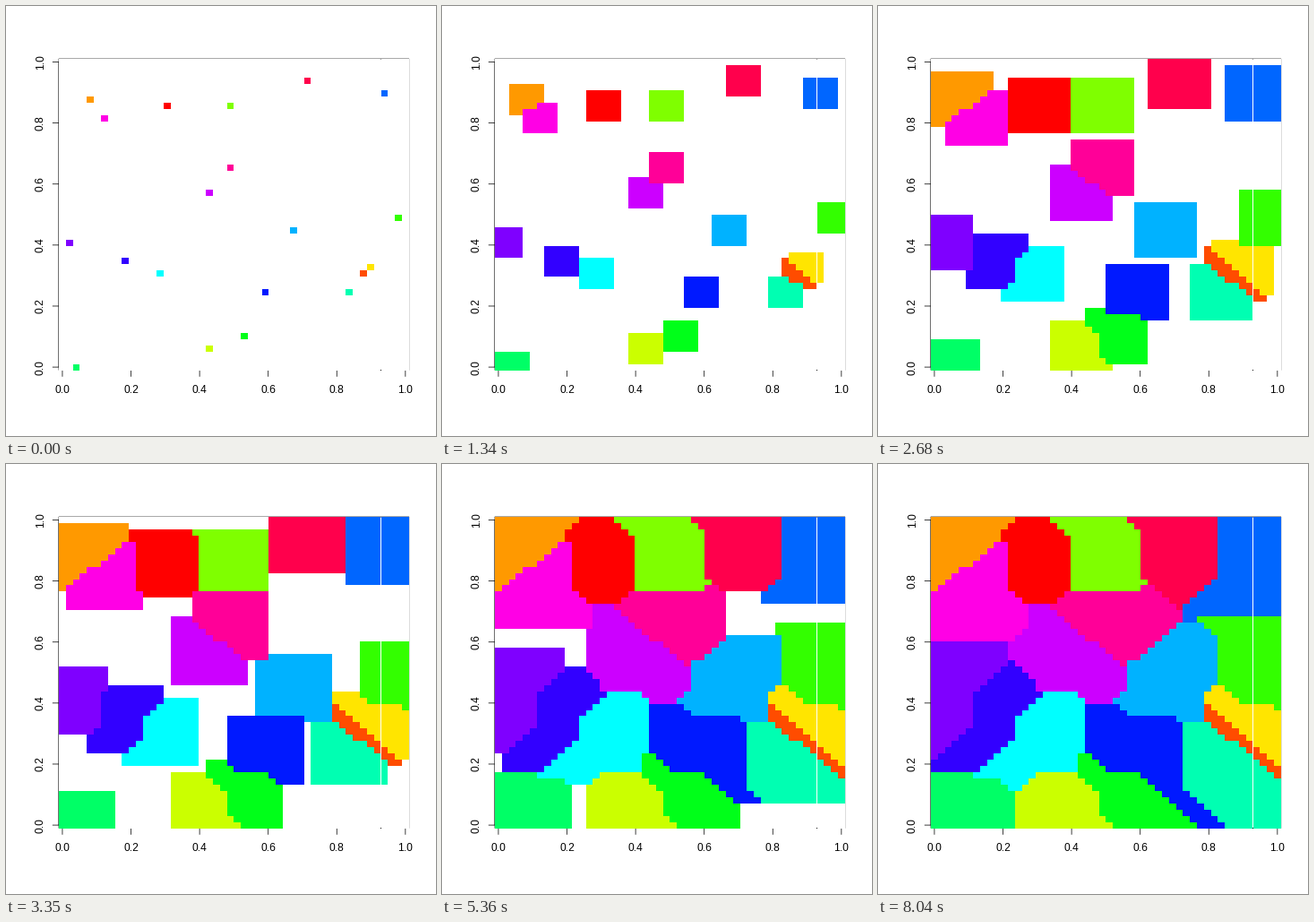
A matplotlib script for the animation above (8710 ms loop, 480 px wide and 480 px high).

```python
"""Twenty coloured seeds grow over a 50 x 50 grid until they fill the plot."""
import colorsys

import matplotlib.pyplot as plt
import numpy as np
from matplotlib.animation import FuncAnimation

STAGE = 480
DPI = 100
PT = 72 / DPI  # points per pixel
N = 50
FRAMES, INTERVAL = 13, 670

# Plot region in pixels, y pointing down
LEFT, RIGHT, TOP, BOTTOM = 59.04, 449.76, 59.04, 406.56
CELL_W = (RIGHT - LEFT) / N
CELL_H = (BOTTOM - TOP) / N
SEAM = 418  # pixel column left unpainted between two cells

# Seed cells (column, row from the bottom), in hue order
SEEDS = [
    (15, 42), (43, 15), (4, 43), (44, 16), (21, 3),
    (24, 42), (48, 24), (26, 5), (2, 0), (41, 12),
    (14, 15), (33, 22), (46, 44), (29, 12), (9, 17),
    (1, 20), (21, 28), (6, 40), (24, 32), (35, 46),
]
PALETTE = np.array([colorsys.hsv_to_rgb(k / len(SEEDS), 1, 1)
                    for k in range(len(SEEDS))])


def nearest_seeds():
    """Chebyshev distance to, and index of, the closest seed of each cell."""
    rows, cols = np.mgrid[:N, :N]
    dist = np.array([np.maximum(abs(cols - c), abs(rows - r))
                     for c, r in SEEDS])
    best = dist.min(axis=0)
    # ties go to the later seed
    owner = len(SEEDS) - 1 - np.argmin(dist[::-1], axis=0)
    return best, owner


DIST, OWNER = nearest_seeds()

# Pixels of the plot region and the cell each one belongs to
PX = np.arange(59, 450)
PY = np.arange(59, 407)
COL = ((PX + 0.5 - LEFT) / CELL_W).astype(int)
ROW = ((BOTTOM - PY - 0.5) / CELL_H).astype(int)


def picture(radius):
    cells = np.where((DIST <= radius)[..., None], PALETTE[OWNER], 1.0)
    image = np.zeros((STAGE, STAGE, 4))
    image[59:407, 59:450, :3] = cells[np.ix_(ROW, COL)]
    image[59:407, 59:450, 3] = 1
    image[:, SEAM, 3] = 0
    return image


fig = plt.figure(figsize=(STAGE / DPI, STAGE / DPI), dpi=DPI, facecolor="white")
ax = fig.add_axes([0, 0, 1, 1])
ax.set_xlim(0, STAGE)
ax.set_ylim(STAGE, 0)
ax.axis("off")


def line(xs, ys):
    ax.plot(xs, ys, color="black", lw=0.75 * PT, snap=False, zorder=1,
            solid_capstyle="butt", solid_joinstyle="round")


def label(x, y, value, rotation=0):
    ax.text(x, y, f"{value:.1f}", family="Liberation Sans", size=12 * PT,
            color="black", ha="center", va="baseline",
            rotation=rotation, rotation_mode="anchor")


def x_at(value):
    return LEFT + (value * (N - 1) + 0.5) * CELL_W


def y_at(value):
    return BOTTOM - (value * (N - 1) + 0.5) * CELL_H


line([LEFT, RIGHT, RIGHT, LEFT, LEFT], [BOTTOM, BOTTOM, TOP, TOP, BOTTOM])
line([x_at(0), x_at(1)], [BOTTOM, BOTTOM])
line([LEFT, LEFT], [y_at(0), y_at(1)])
for tick in np.linspace(0, 1, 6):
    x, y = x_at(tick), y_at(tick)
    line([x, x], [BOTTOM, BOTTOM + 7.2])
    line([LEFT, LEFT - 7.2], [y, y])
    label(x, BOTTOM + 25.92, tick)
    label(LEFT - 17.28, y, tick, rotation=90)

grid = ax.imshow(picture(0), extent=(0, STAGE, STAGE, 0), aspect="auto",
                 interpolation="nearest", zorder=2)


def update(radius):
    grid.set_data(picture(radius))
    return (grid,)


anim = FuncAnimation(fig, update, frames=FRAMES, interval=INTERVAL,
                     repeat=True, repeat_delay=0)
plt.show()
```
